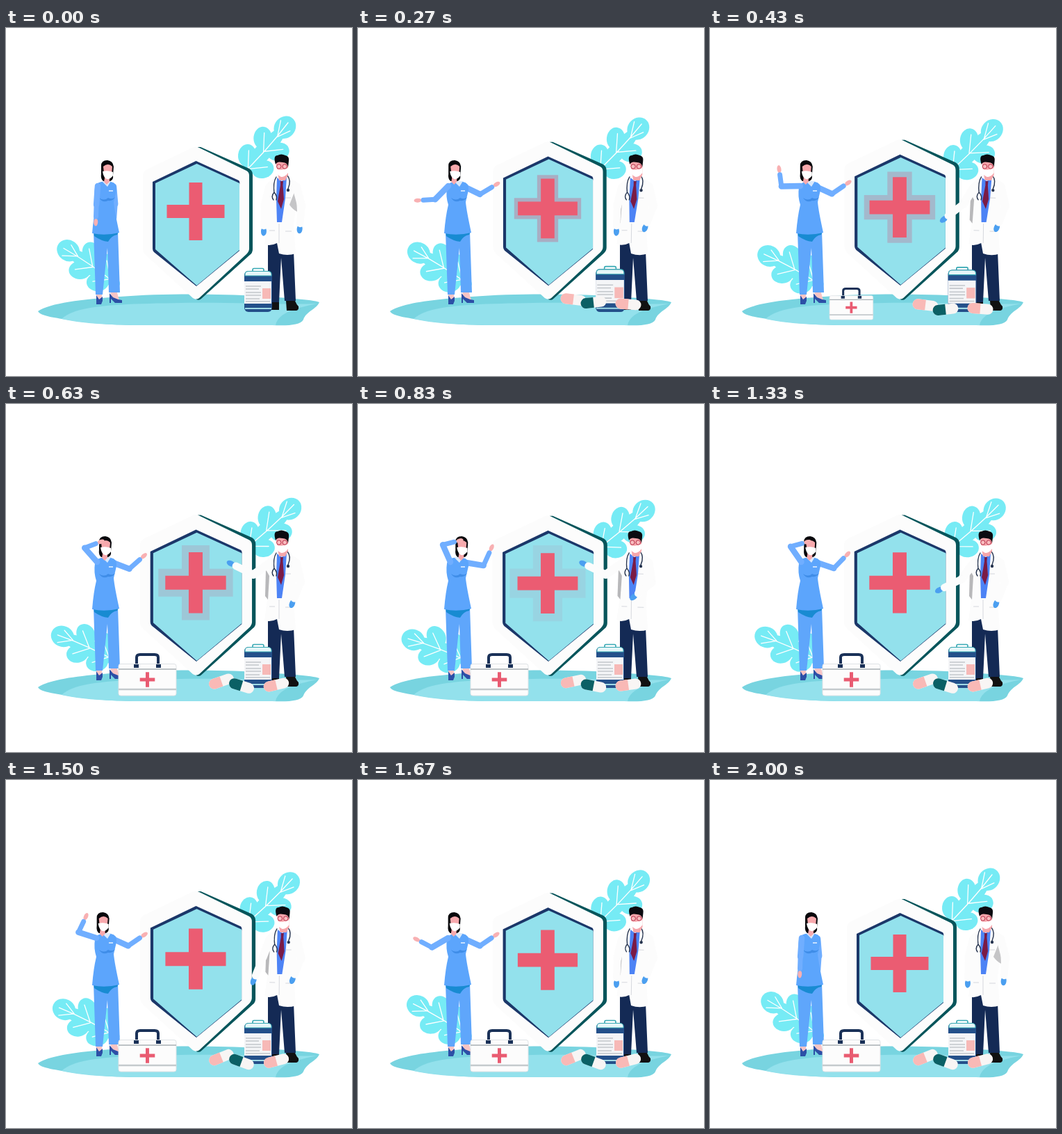
An HTML page for the animation above (2.03 s loop, 498 by 500 pixels).

```html
<!DOCTYPE html>
<html lang="en">
<head>
<meta charset="utf-8">
<title>Medical team</title>
<style>
  html, body { margin: 0; width: 100%; height: 100%; overflow: hidden; background: #fff; }
  svg { display: block; width: 100vw; height: 100vh; }
  .vein { fill: none; stroke: #fff; stroke-width: 1.3; stroke-linecap: round; }
  .limb { fill: none; stroke-linecap: round; stroke-linejoin: round; }
</style>
</head>
<body>
<svg viewBox="0 0 498 500" xmlns="http://www.w3.org/2000/svg">
  <defs>
    <path id="plus" d="M-9.5-41.5h19v32h32v19h-32v32h-19v-32h-32v-19h32z"/>
  </defs>

  <g id="leaves" fill="#76ebf5"></g>

  <path fill="#78d4e0" d="M46 407C64 395 108 390 164 386C224 381 309 382 361 385C402 388 441 390 451 394C447 404 432 407 428 419C424 427 406 428 383 427H190C150 427 110 423 87 419C70 416 50 414 46 407Z"/>
  <path fill="#93e1ec" d="M80 418Q86 412 100 407C130 397 190 396 252 395C326 394 401 398 447 396C420 402 392 408 388 427H190C150 427 105 424 80 418Z"/>

  <g id="shield">
    <path fill="#07555b" d="M276 171L280 171L350 202Q355 205 355 211V318Q355 323 351 326L281 389Q278 392 274 390Z"/>
    <path fill="#fcfcfc" d="M268 172Q273 169 278 172L346 205Q350 207 350 212V317Q350 321 346 325L278 388Q274 391 269 388L201 326Q197 322 197 317V212Q197 207 201 204Z"/>
    <path fill="#1b3769" d="M273.5 191L335 219Q337 221 336 225V320L274 371L213 322Q211 320 211 317V221Z"/>
    <path fill="#93e1ec" d="M274.5 195L336 223V319L274.5 370L215 318V223Z"/>
    <use id="glow" href="#plus" fill="#c46f91" stroke="#c46f91" transform="translate(273 263.5)"/>
    <use href="#plus" fill="#eb5c72" transform="translate(273 263.5)"/>
  </g>

  <g id="doctor">
    <path fill="#142a55" d="M377 296H413L417 392H401L396 330L393 394H377Z"/>
    <path fill="#111" d="M376 394H393V405H370Q371 399 376 394ZM403 392H416Q418 397 421 400Q422 405 418 406H404Z"/>
    <g id="doctorBody">
      <path fill="#fcfcfc" d="M389 215Q376 220 373 229L376 281L372 311Q381 314 390 309L393 324Q405 328 417 324L414 283L420 237Q427 229 418 221L405 214Z"/>
      <path id="shadeLeft" fill="#b8b8ba" d="M374 238L379 247L377 281L373 276Z"/>
      <path id="shadeRight" fill="#c5c5c7" d="M415 236L408 254Q412 260 419 264L418 242Z"/>
      <path fill="#4d83f5" d="M390 215L397 220L404 214L402 245L397 279H390L389 246Z"/>
      <path fill="#7a1b46" d="M395 220H399L398.5 226L400 246L396 260L391 249L395 226Z"/>
      <path class="limb" stroke="#26344f" stroke-width="1.4" d="M389 214Q384 222 386 237M405 212Q411 219 406 231M386 236Q381 242 385 247M386 236Q391 242 389 247"/>
      <circle cx="406" cy="233" r="2.2" fill="#26344f"/>
      <path fill="none" stroke="#d5d7dd" d="M402 244H410M402 292H411M379 291H387M393 281V309"/>
    </g>
    <g id="doctorHead">
      <path fill="#f6a6ab" d="M388 191H406V211L402 219H393Z"/>
      <path fill="#fff" d="M387 202Q397 206 406 201V208Q402 214 396 214Q388 210 387 202Z"/>
      <path fill="#0b0b10" d="M388 196Q384 183 391 183Q396 180 402 183Q408 184 407 191L406 200Q405 193 398 193Q390 191 388 196Z"/>
      <g fill="#f9bdbf" stroke="#b8324c"><circle cx="392.8" cy="199" r="3.2"/><circle cx="401.2" cy="199" r="3.2"/></g>
    </g>
    <g id="doctorArms"></g>
  </g>

  <g id="bottle">
    <rect x="355" y="345.5" width="16" height="7" rx="2" fill="#fff" stroke="#36a8b3" stroke-width="1.6"/>
    <rect x="343" y="349" width="40" height="59" rx="6" fill="#24508a"/>
    <path fill="#e5f6f8" stroke="#36a8b3" d="M344 356V354Q344 349.500 349 349.500H377Q382 349.500 382 354V356Z"/>
    <path fill="#f4f5f7" d="M343 364H382V396H343Z"/>
    <path fill="#9fdae5" d="M344 402H382V404H344Z"/>
    <path stroke="#c3c7cc" stroke-width="1.5" d="M345 371H367M345 375H364M345 380H367M345 384H367M345 389H365M345 393H380"/>
    <rect x="369" y="374" width="12" height="15" fill="#f7b9b7"/>
  </g>

  <g id="capsules"></g>

  <g id="woman">
    <g id="armBack"></g>
    <path fill="#f9c4c5" d="M130 379H138V391H130ZM150 377H159L163 391L152 388Z"/>
    <path fill="#5fa6fb" d="M126 292H161L164 380H148L146 316L139 383H129Z"/>
    <path fill="#2c4fa6" d="M130 384L134 390L139 386V392L137 397H130ZM149 381L154 387Q160 390 167 391V395H157L151 389V395H149Z"/>
    <path fill="#188bd2" d="M126 293H162L160 297Q152 298 147 307Q137 306 127 299Z"/>
    <path fill="#5ca5fc" d="M137 221H151Q160 222 159 233L155 250Q156 262 163 294Q143 299 124 295Q126 270 130 254Q126 242 128 229Q129 223 137 221Z"/>
    <path fill="#3f8de8" d="M134 244Q141 249 147 244Q153 247 157 243Q154 249 147 248Q139 252 134 244Z"/>
    <path stroke="#e9f3ff" stroke-width="1.5" d="M148 234H154"/>
    <path fill="#d9e9fb" d="M138 220H151L146 228Z"/>
    <g id="womanHead">
      <path fill="#08080c" d="M137 198Q137 190 146 190Q154 191 155 199L154 212Q155 218 150 220H140Q136 217 137 209Z"/>
      <path fill="#f7a9ad" d="M140 199Q147 193 153 199L152 211L149 217V221L145 225L141 221L142 216Z"/>
      <path fill="#fff" d="M139 206Q147 204 154 207V212Q150 218 145 217Q140 214 139 206Z"/>
    </g>
    <g id="armFront"></g>
  </g>

  <g id="kit">
    <path class="limb" stroke="#1a3158" stroke-width="4" d="M188 375V364Q188 360 193 360H214Q219 360 219 364V375"/>
    <rect x="162" y="373.5" width="83" height="45.5" rx="3" fill="#fcfcfc" stroke="#dfe3e6"/>
    <path stroke="#a9b0b5" stroke-width="1.6" d="M162 381H245"/>
    <path stroke="#c4cacd" stroke-width="2.4" d="M162 410H245"/>
    <path fill="#1a3158" d="M184 374h7v5h-7zM216 374h7v5h-7z"/>
    <use href="#plus" fill="#e95b71" transform="translate(203.5 396) scale(.26)"/>
  </g>
</svg>

<script>
const LOOP = 2030, MOTION = 2000;
const $ = id => document.getElementById(id);
const set = (node, attrs) => { for (const k in attrs) node.setAttribute(k, attrs[k]); };
const clamp = x => Math.max(0, Math.min(1, x));
const ease = x => (x = clamp(x)) * x * (3 - 2 * x);
const easeOut = x => 1 - (1 - clamp(x)) ** 3;
const hill = x => Math.sin(Math.PI * clamp(x));
const scaleAt = (x, y, s) => `translate(${x} ${y}) scale(${s}) translate(${-x} ${-y})`;

function add(parent, tag, attrs = {}) {
  const node = document.createElementNS('http://www.w3.org/2000/svg', tag);
  set(node, attrs);
  return parent.appendChild(node);
}

// A leaf grows along +x: a body, a round tip and paired lobes, fuller on one side.
function makeLeaf(x, y, angle, length) {
  const swing = add($('leaves'), 'g');
  const leaf = add(swing, 'g', { transform: `translate(${x} ${y}) rotate(${angle})` });
  const blob = (cx, cy, rx, ry, turn) =>
    add(leaf, 'ellipse', { rx, ry, transform: `translate(${cx} ${cy}) rotate(${turn})` });
  blob(length * .45, 2, length * .42, 12, 0);
  blob(length * .87, 2, 17, 15, 0);
  let veins = `M0 0Q${length / 2} 5 ${length * .94} 1`;
  for (const u of [.28, .57]) {
    for (const side of [-1, 1]) {
      const reach = side > 0 ? 18 : 12;
      blob(length * (u + .02), side * reach, 16, 13, side * 35);
      veins += `M${length * (u - .1)} 2L${length * (u + .08)} ${side * (reach + 3)}`;
    }
  }
  veins += `M${length * .72} 3L${length * .9} -9M${length * .72} 3L${length * .88} 11`;
  add(leaf, 'path', { class: 'vein', d: veins });
  return angleBy => set(swing, { transform: `rotate(${angleBy} ${x} ${y})` });
}
const swingLeft = makeLeaf(165, 373, 214, 106);
const swingRight = makeLeaf(333, 217, -48.5, 116);

// Each joint is [length, resting angle, raised angle]; its drive says how far it is raised.
const BLUE = { width: 8.5, color: '#70aeff', skin: '#f8b0b2', handSize: 4.5 };
const COAT = { width: 12, color: '#fcfcfc', skin: '#4b9ff0', handSize: 5.5 };
const wave = p => .75 * ease(p / .3) + .25 * ease((p - .5) / .5);
const point = (p, t) => ease((t - 270) / 350) * (1 - ease((t - 1030) / 640));
const toChest = p => .19 * ease(p / .3) + .81 * ease((p - .7) / .3);
const ARMS = [
  { ...BLUE, layer: 'armFront', x: 132, y: 227, upper: [27, 94, 246], fore: [25, 92, 346],
    drive: p => ease(p / .8), foreDrive: p => ease(p / .7) },
  { ...BLUE, layer: 'armBack', x: 155, y: 228, upper: [25, 85, 4], fore: [28, 94, -77], drive: wave },
  { ...COAT, layer: 'doctorArms', x: 379, y: 229, upper: [28, 104, 145], fore: [36, 92, 206], drive: point },
  { ...COAT, layer: 'doctorArms', x: 418, y: 228, upper: [29, 75, 88], fore: [33, 95, 185], drive: toChest }
];
for (const arm of ARMS) {
  const layer = $(arm.layer);
  arm.hand = add(layer, 'ellipse', { rx: arm.handSize + 1, ry: arm.handSize - 1.5, fill: arm.skin });
  arm.sleeve = add(layer, 'path', { class: 'limb', stroke: arm.color, 'stroke-width': arm.width });
  arm.cuff = add(layer, 'path', { class: 'limb', stroke: arm.color, 'stroke-width': arm.width - 1.5 });
}
function drawArm(arm, p, t, shift) {
  const step = ([x, y], length, deg) =>
    [x + length * Math.cos(deg * Math.PI / 180), y + length * Math.sin(deg * Math.PI / 180)];
  const bend = ([, rest, raised], drive) => rest + (raised - rest) * drive(p, t);
  const foreAngle = bend(arm.fore, arm.foreDrive || arm.drive);
  const shoulder = [arm.x + shift, arm.y];
  const elbow = step(shoulder, arm.upper[0], bend(arm.upper, arm.drive));
  const wrist = step(elbow, arm.fore[0] - 8, foreAngle);
  const hand = step(elbow, arm.fore[0], foreAngle);
  set(arm.sleeve, { d: `M${shoulder}L${elbow}` });
  set(arm.cuff, { d: `M${elbow}L${wrist}` });
  set(arm.hand, { transform: `translate(${hand}) rotate(${foreAngle})` });
}

const CAPSULES = [
  { x: 310, y: 398.5, color: '#f9b9b6', tilt: -22, start: 120 },
  { x: 339, y: 405, color: '#0b6065', tilt: 20, start: 140 },
  { x: 389, y: 403.5, color: '#f9b9b6', tilt: -15, start: 100 }
];
for (const c of CAPSULES) {
  c.node = add($('capsules'), 'g');
  add(c.node, 'rect', { x: -18.5, y: -7.5, width: 37, height: 15, rx: 7.5, fill: '#f8f5f4' });
  add(c.node, 'path', { d: 'M0-7.5H-11A7.5 7.5 0 0 0-11 7.5H0Z', fill: c.color });
}

function render(time) {
  const t = Math.min(time, MOTION);
  const p = 1 - Math.abs(2 * t / MOTION - 1); // there and back again

  const sway = (1 - Math.cos(Math.PI * p)) / 2;
  swingLeft(-14.5 * sway);
  swingRight(9 * sway);

  set($('shield'), { transform: scaleAt(273.5, 390, 1 + .053 * Math.sin(2.48 * p)) });
  const spread = clamp(t / MOTION * 2);
  set($('glow'), {
    opacity: .6 * (1 - spread) * ease(t / 150),
    'stroke-width': 22 * (1 - (1 - spread) ** 2)
  });

  const womanLean = 4 * p - 9 * hill(p / .8);
  const doctorLean = 1.75 * (1 - Math.cos(2 * Math.PI * p / .65));
  set($('womanHead'), { transform: `translate(${womanLean} 0)` });
  set($('doctorHead'), { transform: `translate(${doctorLean} 0)` });
  set($('doctorBody'), { transform: `rotate(${doctorLean * .3} 396 325)` });
  set($('shadeLeft'), { opacity: clamp(p / .22) });
  set($('shadeRight'), { opacity: 1 - clamp(p / .22) });
  for (const arm of ARMS) {
    drawArm(arm, p, t, .3 * (arm.layer === 'doctorArms' ? doctorLean : womanLean));
  }

  set($('bottle'), { transform: scaleAt(363, 408, 1 + .045 * hill(t / 540)) });
  const rock = t < 1400 ? .25 + .75 * Math.cos(2 * Math.PI * t / 700) : 1;
  for (const c of CAPSULES) {
    const drop = 1 - easeOut((t - c.start) / 400);
    set(c.node, {
      visibility: t >= c.start ? 'visible' : 'hidden',
      transform: `translate(${c.x} ${c.y - 35 * drop}) rotate(${c.tilt * rock})`
    });
  }

  const pop = easeOut((t - 300) / 350);
  set($('kit'), { visibility: pop > 0 ? 'visible' : 'hidden', transform: scaleAt(203, 419, pop) });
}

const start = performance.now();
function tick() {
  render((performance.now() - start) % LOOP);
  requestAnimationFrame(tick);
}
render(0);
requestAnimationFrame(tick);
</script>
</body>
</html>
```
